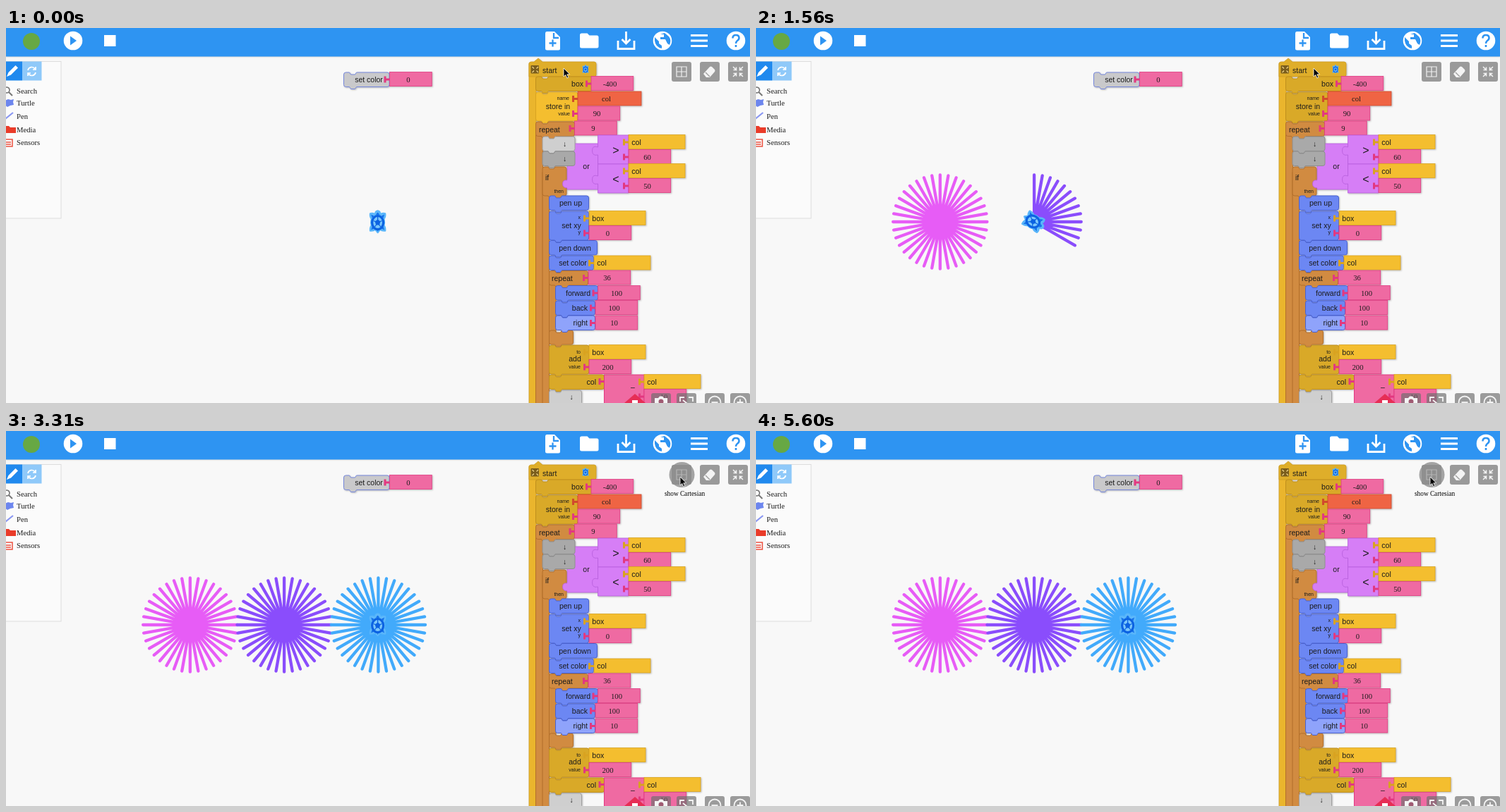
These frames come from a looping animation (1054x532 px, 7.88 s). An HTML page:

```html
<!DOCTYPE html>
<html lang="en">
<head>
<meta charset="utf-8">
<title>Turtle rays</title>
<style>
html, body { margin: 0; width: 100%; height: 100%; overflow: hidden; background: #f8f8f8; }
svg { display: block; width: 100vw; height: 100vh; }
text { font: 10.5px "Liberation Sans", Arial, sans-serif; fill: #1c1c1c; }
.serif { font: 10.67px "Liberation Serif", "Times New Roman", serif; }
.small { font-size: 7px; }
.tip { font: 9.3px "Liberation Serif", serif; fill: #000; }
.num { font: 7.3px "Liberation Serif", serif; fill: #111; }
.blocks { filter: drop-shadow(1px 1px 1px rgba(0,0,0,.25)); }
</style>
</head>
<body>
<svg id="stage" viewBox="0 0 1054 532" preserveAspectRatio="none"></svg>
<script>
const LOOP = 7880, CX = 527.4, CY = 275, UNIT = 66.65;
const $ = id => document.getElementById(id);
const range = n => [...Array(n).keys()];

const YELLOW = ['#f4be2f', '#d9a320'], OCHRE = ['#d9a928', '#c08f1c'], BLUE = ['#6c87f3', '#4a62cf'],
  PALE = ['#8fa3fb', '#4a62cf'], PINK = ['#ef6aa2', '#e23880'], ORANGE = ['#d18b41', '#b26f2b'],
  GRAY = ['#a9a9a9', '#8e8e8e'], LIGHT = ['#cfcfcf', '#a0a0a0'], VIOLET = ['#d67ef6', '#b75fdc'],
  RED = ['#ef6444', '#d14a2c'];

const text = (x, y, s, anchor = 'start', cls = '') =>
  `<text x="${x}" y="${y}" text-anchor="${anchor}" class="${cls}">${s}</text>`;
const rect = (x, y, w, h, fill, more = '') =>
  `<rect x="${x}" y="${y}" width="${w}" height="${h}" fill="${fill}" ${more}/>`;
const path = (d, fill, stroke = 'none', width = 1, more = '') =>
  `<path d="${d}" fill="${fill}" stroke="${stroke}" stroke-width="${width}" ${more}/>`;
const circle = (x, y, r, fill, more = '') => `<circle cx="${x}" cy="${y}" r="${r}" fill="${fill}" ${more}/>`;
const group = (s, more = '') => `<g ${more}>${s}</g>`;

// Stackable block: notch on top, tab below
function block(x, y, w, h, [fill, stroke], id = '') {
  const d = `M${x + 3} ${y}h5l2 3h6l2-3h${w - 21}q3 0 3 3v${h - 6}q0 3-3 3h${21 - w}l-2 3h-6l-2-3h-5q-3 0-3-3v${6 - h}q0-3 3-3z`;
  return path(d, fill, stroke, 1, id && `id="${id}"`);
}
// Tab of a clamp that fills the notch of its first inner block
const innerTab = (x, y) => rect(x + 7, y - 1.5, 12, 5, ORANGE[0]);
const bar = (x, y, w, bottom) => rect(x, y, w, bottom - y, ORANGE[0], `stroke="${ORANGE[1]}"`);
const plug = (x, y, color) => path(`M${x - 8} ${y + 6}h3v3h5v3h-5v3h-3z`, color);

// Value plugged in from the left
function value(x, y, w, [fill, stroke], label, lx, cls = 'serif') {
  return plug(x, y, stroke) + rect(x, y, w, 20, fill, `stroke="${stroke}" stroke-width=".8"`) +
    text(lx, y + 14, label, cls ? 'middle' : 'start', cls);
}
const pink = (x, y, label, lx) => value(x, y, 59.7, PINK, label, lx);
const name = (x, y, label) => value(x, y, 80, YELLOW, label, x + 4.3, '');

function program() {
  return rect(741, 50, 10, 490, '#eab52d', 'stroke="#cf9d22" stroke-width=".8"') +
    bar(750.5, 140, 10, 540) + bar(760, 205, 9.5, 540) + bar(769.5, 350, 9.5, 447) +
    path('M741 51q0-3 3-3h4l6-5 6 5h73q3 0 3 3v15q0 3-3 3h-92z', '#dfae2a', '#cf9d22', .8) +
    block(750.5, 69, 80, 20.5, OCHRE) + text(818, 83, 'box', 'end') + pink(829, 68.5, '-400', 855.5) +
    block(750.5, 91, 59.5, 41, OCHRE, 'store') + text(782, 114.5, 'store in', 'middle') +
    text(798, 102, 'name', 'end', 'small') + text(799, 123.5, 'value', 'end', 'small') +
    value(810, 90, 90, RED, 'col', 850.5) + pink(810, 111, '90', 837) +
    block(750.5, 133, 55, 20.5, ORANGE) + text(755, 147.5, 'repeat') + pink(805.5, 132, '9', 832) +
    path('M795 164h44v65h-44v-2q-7 2-7-6t7-5z', VIOLET[0], VIOLET[1], .8) + text(822, 200, 'or', 'middle') +
    innerTab(760, 154) +
    block(760, 154, 46, 20.5, GRAY, 'first') + text(791.5, 167.5, '↓', 'middle') +
    block(760, 175, 46, 20.5, GRAY) + text(791.5, 188.5, '↓', 'middle') +
    block(760, 197, 34, 41, ORANGE) + text(764, 215.5, 'if') + text(790, 234, 'then', 'end', 'small') +
    path('M795.5 216q-7-1-7 5t7 6z', VIOLET[0], VIOLET[1], .8) + rect(795, 215, 2, 13, VIOLET[0]) +
    [[152, '&gt;', '60'], [193, '&lt;', '50']].map(([y, sign, n]) =>
      path(`M838.5 ${y}h43.5v41h-43.5v-13q-8 2-8-6t8-5z`, VIOLET[0], VIOLET[1], .8) +
      `<text x="864" y="${y + 26.5}" text-anchor="middle" style="font-size:16px">${sign}</text>` +
      name(882, y - .5, 'col') + pink(882, y + 20.5, n, 908.5)).join('') +
    innerTab(769.5, 238) +
    block(769.5, 238, 56, 20.5, BLUE) + text(800, 252, 'pen up', 'middle') +
    block(769.5, 260, 56, 41, BLUE) + text(801, 283.5, 'set xy', 'middle') +
    text(814, 271, 'x', 'end', 'small') + text(814, 292, 'y', 'end', 'small') +
    name(826, 259.5, 'box') + pink(826, 280.5, '0', 852.5) +
    block(769.5, 301.5, 68, 20.5, BLUE) + text(806, 315.5, 'pen down', 'middle') +
    block(769.5, 323, 63, 20.5, BLUE) + text(803, 336.5, 'set color', 'middle') + name(833, 323, 'col') +
    block(769.5, 344.5, 55, 20.5, ORANGE) + text(773, 359, 'repeat') + pink(825, 344, '36', 851.5) +
    block(769.5, 429, 34, 20, ORANGE) + innerTab(778.5, 365.5) +
    block(778.5, 365.5, 60, 20.5, BLUE) + text(828, 379.5, 'forward', 'end') + pink(838.5, 365.5, '100', 865) +
    block(778.5, 387, 56, 20.5, BLUE) + text(824, 401, 'back', 'end') + pink(835, 386.5, '100', 861.5) +
    block(778.5, 408, 56, 20.5, PALE) + text(824, 422, 'right', 'end') + pink(835, 408, '10', 861.5) +
    block(769.5, 450, 56.5, 41, OCHRE, 'add') + text(806, 473, 'add', 'middle') +
    text(814, 461.5, 'to', 'end', 'small') + text(814, 482.5, 'value', 'end', 'small') +
    name(826, 449.5, 'box') + pink(826, 470.5, '200', 852.5) +
    block(769.5, 492, 78, 20.5, OCHRE, 'minus') + text(836, 505.5, 'col', 'end') + plug(847.5, 491, PINK[1]) +
    rect(847.5, 492, 56.5, 42, PINK[0], `stroke="${PINK[1]}"`) + text(888, 513, '–', 'middle') +
    name(904, 491.5, 'col') + pink(904, 512.5, '10', 932) +
    block(769.5, 514, 46, 20.5, LIGHT) + text(801, 526.5, '↓', 'middle') +
    rect(743.5, 53, 11.5, 11.5, '#7a5d1d', 'rx="1"') +
    path('M745.5 55l2.500 2.500m3.500 0l2.500-2.500m0 8l-2.500-2.500m-3.500 0l-2.500 2.500', 'none', '#f3d98c', 1.1) +
    text(760, 63.5, 'start') +
    group(TURTLE, 'transform="translate(821 58.5) scale(.38)"') +
    block(478.5, 63, 64.5, 20.5, ['#c9c9cb', '#7486dc']) + text(514, 76.5, 'set color', 'middle') + pink(543.5, 62.5, '0', 570);
}

const TURTLE =
  path('M-3-10Q-4-15 0-15.500Q4-15 3-10Q7-13 10.500-11.500Q11-7 8.500-4Q10 1 8.500 5Q11 8 10.500 12.500Q6 13 3.500 10.500L0 15L-3.500 10.500Q-6 13-10.500 12.500Q-11 8-8.500 5Q-10 1-8.500-4Q-11-7-10.500-11.500Q-7-13-3-10Z', '#6cc0fb', '#5ab6fa', 2.5, 'stroke-linejoin="round"') +
  path('M-2.500-10Q0-17 2.500-10ZM-9.500-10.500l4.500 2-3 3zM9.500-10.500l-4.500 2 3 3zM-9.500 11.500l4.500-2-3-3zM9.500 11.500l-4.500-2 3-3zM-1.500 11h3l-1.500 3z', '#1674ea') +
  '<ellipse cx="0" cy="1" rx="8" ry="9.5" fill="#7cc8fb" stroke="#0c63e2" stroke-width="3.2"/>' +
  path('M0 1V-7M0 1L6-1.500M0 1L4 7M0 1L-4 7M0 1L-6-1.500', 'none', '#0c63e2', 1.3) +
  path('M0-3.500L3.900-.4L2.400 4.400H-2.400L-3.900-.4Z', '#0c63e2');

const header = () =>
  rect(0, 0, 1054, 40.5, '#2e94f2', 'style="filter:drop-shadow(0 .5px 1px rgba(0,0,0,.25))"') +
  circle(36, 19, 12, '#67a844') +
  circle(95, 18, 13.3, '#fff') + path('M91 11.500v13l9-6.500z', '#2e94f2') + rect(139, 10, 16.5, 16, '#fff') +
  path('M766 5h11l8 8v16q0 2.500-2.500 2.500h-16q-2.500 0-2.500-2.500v-21.500q0-2.500 2-2.500z', '#fff') +
  path('M776 7v7h7M774.500 16.500v10M769.500 21.500h10', 'none', '#2e94f2', 2.3) +
  path('M815.500 7.500h8l3 3h10.500q2.500 0 2.500 2.500v13q0 2.500-2.500 2.500h-21.500q-2.500 0-2.500-2.500v-16q0-2.500 2.500-2.500z', '#fff') +
  path('M867 18v11.500h23v-11.500M878.500 5v17m-6-6l6 6 6-6', 'none', '#fff', 2.8) +
  circle(930, 18, 13.3, '#fff') +
  path('M919 13l6 6v3l4 3v4q-9-2-10-11zM927 9h5v4h-5v3h7l3 6 3 2q3-7-1-12l-6-5z', '#2e94f2') +
  path('M970 10.500h24M970 18h24M970 25.500h24', 'none', '#fff', 2.8) +
  circle(1034, 18, 13.3, '#fff') + path('M1029.500 14.500q0-4.500 4.500-4.500t4.500 4q0 2.500-2.500 4-2 1.500-2 4M1034 24v3', 'none', '#2e94f2', 2.6);

const palette = () =>
  rect(-2, 47.5, 80, 222.5, '#fbfbfb', 'stroke="#dcdcdc"') +
  rect(0, 47.5, 23, 27, '#2089ee') + path('M1 69l2.500-6 10-10 3.500 3.500-10 10z', '#fff') +
  rect(23, 47.5, 27.5, 27, '#8fc9f9') +
  path('M31 60a5.500 5.500 0 0 1 10-2M42 63a5.500 5.500 0 0 1-10 2M42 55v4h-4M31 68v-4h4', 'none', '#fff', 1.7) +
  circle(1, 88, 4, 'none', 'stroke="#777" stroke-width="1.7"') + path('M4 91l5 5', 'none', '#777', 2) +
  path('M-2 103l5-2 4 1 4-1-1 4 1 4-5 1-4 2-4-3z', '#6d86ee') +
  path('M-1 129l11-9', 'none', '#8a97f2', 2.2) + path('M-2 139h6l2 2h8v8h-16z', '#ea3c2a') +
  path('M-2 158h11v10h-11M0 162h7M0 165h7', 'none', '#ec5240', 1.5) +
  [['Search', 92.5], ['Turtle', 110], ['Pen', 128.5], ['Media', 147.5], ['Sensors', 166]]
    .map(([s, y]) => text(15, y, s, 'start', 'serif')).join('');

const button = (x, icon, id) => rect(x, 48, 28, 28, '#9a9a9a', `rx="3" id="${id}"`) + icon;
const lowButton = (x, icon) => rect(x - 14, 518, 28, 28, '#6e6e6e', 'rx="3" opacity=".68"') + icon;
const buttons = () =>
  circle(957.5, 62, 18, '#a3a3a3', 'id="ripple"') +
  button(943, path('M950 55h14v14h-14zM957 55v14M950 62h14', 'none', '#e4e4e4', 1.2, 'id="gridIcon"'), 'gridButton') +
  button(983, path('M988 65l9-10q1.500-1 3 0l4 4q1 1.500 0 3l-7 8h-5z', '#f4f4f4') + path('M991 63l6 6', 'none', '#9a9a9a', 1.3), 'cleanButton') +
  button(1023, path('M1030 55l4.500 4.500v-4m0 4h-4M1044 55l-4.500 4.500v-4m0 4h4M1030 69l4.500-4.500v4m0-4h-4M1044 69l-4.500-4.500v4m0-4h4', 'none', '#f4f4f4', 1.5), 'collapse') +
  path('M876 532l15-13 15 13z', '#e62e55') + path('M887 532v-4h8v4', '#fff') +
  lowButton(928, path('M919 535v-10h5l2-2.500h4l2 2.500h5v10z', '#f4f4f4') + circle(928, 530, 3.5, '#a05a72')) +
  lowButton(964, path('M955 530v-6h6M973 530v-6h-6M959 528l10 8', 'none', '#f4f4f4', 1.8)) +
  [1004, 1040].map(x => lowButton(x, circle(x, 531, 8.5, 'none', 'stroke="#f4f4f4" stroke-width="1.8"') +
    path(`M${x - 4.5} 531h9` + (x > 1004 ? `M${x} 526.500v9` : ''), 'none', '#f4f4f4', 1.8))).join('');

function cartesian() {
  const line = (d, color, w) => path(d, 'none', color, w);
  let s = '';
  for (let i = -5; i <= 5; i++) if (i) {
    const x = CX + i * UNIT;
    s += line(`M${x} 40V532`, 'rgba(125,125,125,.6)', .9) + line(`M${x} 272v6`, '#333', 1) +
      text(i < 0 ? x - 6 : x + 2.5, 271, i * 100, i < 0 ? 'end' : 'start', 'num');
  }
  for (let j = -3; j <= 3; j++) if (j) {
    const y = CY - j * UNIT;
    s += line(`M128 ${y}H927`, 'rgba(125,125,125,.6)', .9) + line(`M${CX - 3} ${y}h6`, '#333', 1) +
      text(j < 0 ? CX - 5.5 : CX + 3, y - 2.5, j * 100, j < 0 ? 'end' : 'start', 'num');
  }
  return s + line(`M128 ${CY}H927M${CX} 40V532`, '#3c3c3c', 1.2);
}
const polar = () =>
  range(6).map(i => circle(CX, CY, (i + 1) * UNIT, 'none', 'stroke="#8a8a8a" stroke-opacity=".7" stroke-width=".9"')).join('') +
  range(12).map(i => path(`M${CX} ${CY}h399`, 'none', 'rgba(125,125,125,.6)', .9,
    `transform="rotate(${i * 30} ${CX} ${CY})"`)).join('');

const stars = [
  { x: CX - 4 * UNIT, color: '#e75cf6', from: 245, to: 1082 },
  { x: CX - 2 * UNIT, color: '#8a4dfc', from: 1190, to: 2040 },
  { x: CX, color: '#42aafb', from: 2192, to: 3305 }
];

$('stage').innerHTML =
  group(program(), 'class="blocks"') +
  stars.map((s, i) => path('', 'none', s.color, 4.3, `id="star${i}" stroke-linecap="round"`)).join('') +
  group(TURTLE, 'id="turtle"') + palette() + buttons() +
  group(cartesian(), 'id="cartesian"') + group(polar(), 'id="polar"') + header() +
  '<text id="tip" class="tip" y="92" text-anchor="middle"></text>' +
  path('M0 0v12l2.800-2.500 2 4.500 2-.9-2-4.300h3.900z', '#000', '#fff', .8, 'id="cursor"');

// The picture only changes at these moments
const spans = [[170, 410, 4], [490, 920, 7], [1010, 1070, 2], [1160, 1740, 8], [1800, 2060, 4],
  [2140, 2540, 6], [2600, 2750, 3], [2840, 3310, 6], [3390, 3680, 5]];
const steps = [0, ...spans.flatMap(([a, b, n]) => range(n).map(i => Math.round(a + (b - a) * i / (n - 1)))),
  3920, 5240, 5330, 5600];
const latest = t => steps.filter(s => s <= t).pop();

const trail = [[1740, 790, 57], [2060, 836, 54], [2540, 996, 60], [2750, 992, 63], [2980, 992, 63], [3310, 955, 65]];
function cursorAt(t) {
  const next = trail.findIndex(k => k[0] > t);
  if (next < 0) return [955, 65];
  if (!next) return [790, 57];
  const a = trail[next - 1], b = trail[next], p = (t - a[0]) / (b[0] - a[0]);
  return [a[1] + (b[1] - a[1]) * p, a[2] + (b[2] - a[2]) * p];
}

function rays(x, n) {
  return range(n).map(i => {
    const a = i * Math.PI / 18;
    return `M${x} ${CY}l${UNIT * Math.sin(a)} ${-UNIT * Math.cos(a)}`;
  }).join('');
}

function tipAt(t) {
  if (t < 2600) return ['', 0];
  if (t < 3050) return ['Clean', 1001.5];
  if (t < 3300) return ['', 0];
  return [t < 3920 ? 'show Cartesian' : t < 5240 ? 'show Polar' : t < 5330 ? 'hide Cartesian' :
    t < 5600 ? 'hide Polar' : 'show Cartesian', 961.5];
}

const show = (id, on) => $(id).setAttribute('visibility', on ? 'visible' : 'hidden');
const paint = (id, [fill, stroke]) => { $(id).setAttribute('fill', fill); $(id).setAttribute('stroke', stroke); };

function draw(time) {
  const t = latest(time);
  let x = CX, y = CY, heading = 0;
  stars.forEach((s, i) => {
    const p = Math.min(36, Math.max(0, (t - s.from) / (s.to - s.from) * 36));
    const turn = Math.floor(p), part = p - turn;
    $('star' + i).setAttribute('d', rays(s.x, turn + (part >= .33)));
    if (t < s.from - 30) return;
    heading = turn * 10 % 360;
    const reach = part >= .33 && part < .67 ? UNIT : 0, a = heading * Math.PI / 180;
    x = s.x + reach * Math.sin(a);
    y = CY - reach * Math.cos(a);
  });
  $('turtle').setAttribute('transform', `translate(${x - .8} ${y}) rotate(${heading})`);

  const idle = t < 170;
  paint('store', idle ? YELLOW : OCHRE);
  paint('first', idle ? LIGHT : GRAY);
  for (const id of ['add', 'minus']) paint(id, idle || t >= 1090 ? OCHRE : YELLOW);

  const onGrid = t >= 3300, onClean = t >= 2540 && t < 3050;
  show('ripple', onGrid);
  $('gridButton').setAttribute('fill', onGrid ? '#8f8f8f' : '#9a9a9a');
  $('gridIcon').setAttribute('stroke', onGrid ? '#b4b4b4' : '#f0f0f0');
  $('cleanButton').setAttribute('fill', onClean ? '#c6c6c6' : '#9a9a9a');

  const [label, tipX] = tipAt(t);
  $('tip').textContent = label;
  $('tip').setAttribute('x', tipX);
  show('cartesian', t >= 3920 && t < 5330);
  show('polar', t >= 5240 && t < 5600);
  $('cursor').setAttribute('transform', `translate(${cursorAt(t)})`);
}

const start = performance.now();
function tick() {
  draw((performance.now() - start) % LOOP);
  requestAnimationFrame(tick);
}
tick();
</script>
</body>
</html>
```
